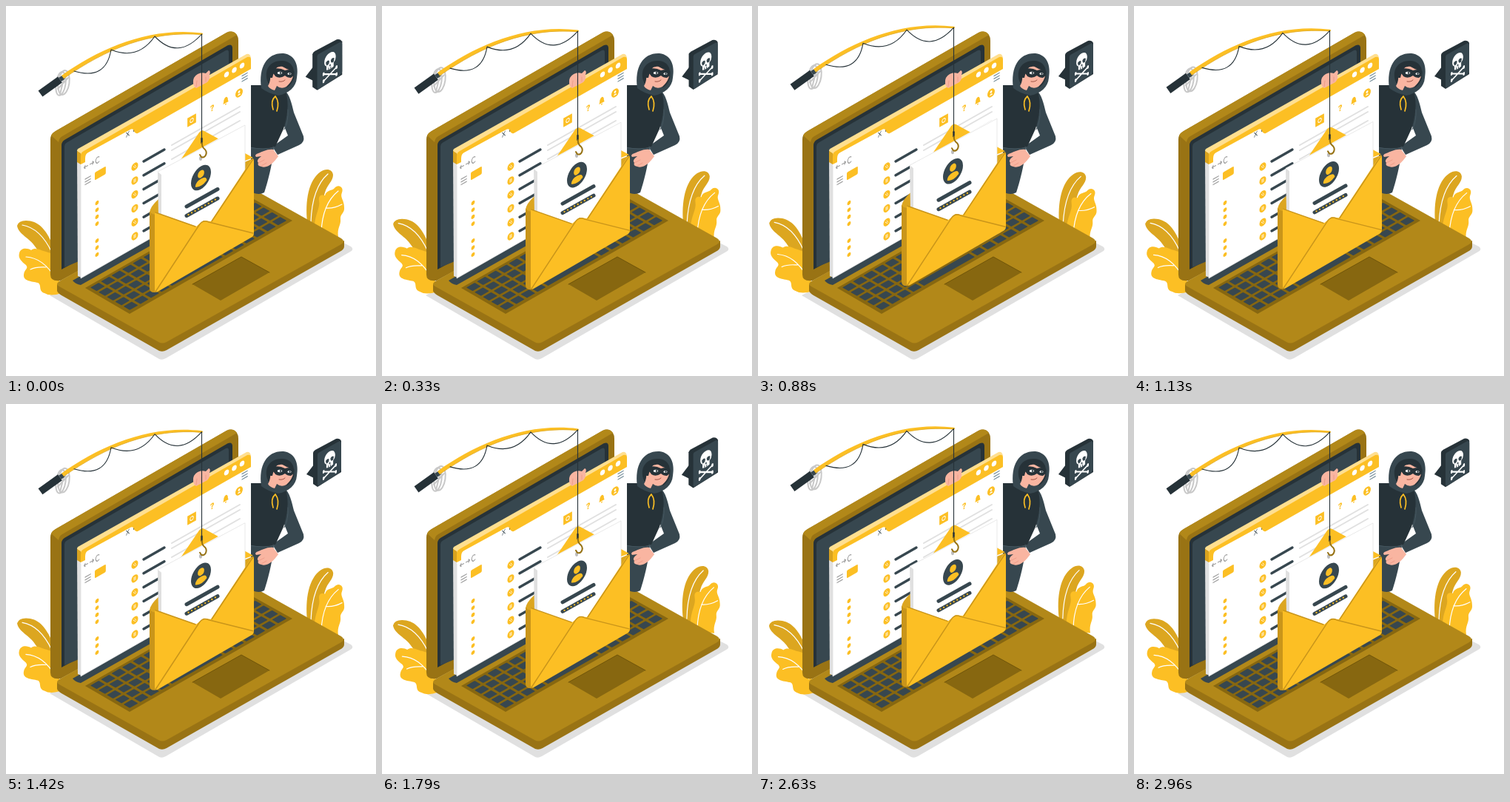
An HTML page that plays this animation: 500 px wide and 500 px high, repeating every 3000 ms.

```html
<!DOCTYPE html>
<html>
<head>
<meta charset="utf-8">
<style>
html, body { margin: 0; height: 100%; overflow: hidden; background: #fff; }
svg { display: block; width: 100vw; height: 100vh; }
.y { fill: #fcbf24; }
.g { fill: #37474f; }
.k { fill: #263238; }
.w { fill: #fff; }
.s { fill: #f9b5a1; }
.line { fill: none; stroke-linecap: round; stroke-linejoin: round; }
text { font: 10px Inter, sans-serif; text-anchor: middle; }
</style>
</head>
<body>
<svg viewBox="0 0 500 500">
  <path fill="#e0e0e0" d="M59 391L207 477Q211 479 216 476L467 331Q470 328 466 325L440 312L80 380Z"/>

  <g id="plants">
    <path fill="#dca620" d="M15 297Q17 290 27 290C43 290 54 301 63 323L66 342Q50 341 40 326C32 313 17 309 15 297Z"/>
    <path class="y" d="M18 334C20 326 29 327 34 330C40 325 48 331 54 332L66 336L75 388Q60 393 52 388C43 385 49 377 43 374C35 372 23 372 24 363C25 355 31 355 27 350C21 345 16 341 18 334Z"/>
    <path class="line" stroke="#fff" stroke-width="1.2" d="M22 296C40 299 53 314 62 333M27 339C43 340 55 349 68 369M33 356C41 352 47 353 54 353"/>
    <path fill="#dca620" d="M407 292C404 263 409 235 425 224C432 219 441 220 442 228C442 237 434 241 431 252C428 262 426 270 424 300L410 300Z"/>
    <path class="y" d="M417 298C417 282 425 273 423 263C422 255 427 255 431 256C433 248 441 250 444 246C449 240 457 245 454 252C451 259 457 262 457 272C458 280 451 281 452 288C453 296 447 300 449 312L425 309Z"/>
    <path class="line" stroke="#fff" stroke-width="1.2" d="M435 227C420 240 413 264 412 292M449 250C434 262 427 280 426 306M432 273Q443 274 454 268"/>
  </g>

  <!-- laptop lid -->
  <path fill="#997314" d="M60 180Q60 173 67 169L298 36Q306 32 312 39Q314 42 314 47V240L74 371Q60 373 60 363Z"/>
  <path fill="#b28819" d="M61 175Q63 171 67 169L298 36Q307 32 312 39L307 42L76 176Q72 178 71 184Z"/>
  <path class="k" d="M75 188Q75 184 79 181L300 53Q306 51 306 57V230L75 356Z"/>
  <path class="g" d="M79 190Q79 186 83 184L297 60Q301 58 301 63V220L96 346L79 353Z"/>

  <!-- laptop base -->
  <path fill="#997314" d="M69 376V385Q70 388 75 391L207 466Q212 468 217 465L451 332Q457 329 457 325V317L211 455Z"/>
  <path fill="#b28819" d="M72 372L311 238Q315 236 319 239L453 314Q459 318 453 322L217 454Q211 457 206 454L72 379Q66 376 72 372Z"/>
  <path class="g" d="M90 371L317 241L330 248L101 377Q94 376 90 371Z"/>
  <path fill="#876710" d="M107 381L326 256L387 290L167 416Z"/>
  <g id="keys"></g>
  <path fill="#876710" d="M252 376L318 339L356 360L290 398Z"/>
  <path class="line" stroke="#705509" d="M252 376L318 339L356 360"/>

  <!-- intruder -->
  <path class="g" d="M326 185H362C362 208 353 240 349 252Q342 256 333 252L326 240Z"/>
  <path class="g" d="M375 113C384 119 386 133 389 144L402 176Q404 184 396 188L367 201L360 190L381 175L371 150Z"/>
  <path class="k" d="M326 107H350L378 115C383 132 380 150 375 166L364 190Q350 195 326 190Z"/>
  <path class="line" stroke="#45565f" d="M329 191Q348 195 363 191M381 140Q382 156 376 167M361 190L367 200"/>
  <path class="s" d="M361 194C353 193 347 197 341 199Q335 201 338 204L345 203Q337 209 341 212Q339 216 345 217C353 220 362 212 368 203Z"/>
  <path class="line" stroke="#e8937f" stroke-width=".7" d="M341 212L349 208M345 216L352 212"/>
  <path class="g" d="M345 111C341 82 353 63 375 64C391 66 396 81 393 97C392 110 382 118 368 121Q354 118 345 111Z"/>
  <path class="k" d="M353 101C348 84 359 73 374 74C387 75 391 86 389 98Q386 106 380 110L356 108Z"/>
  <path class="s" d="M358 88C364 80 380 80 388 86C390 94 386 103 379 109Q372 113 366 108L363 114Q356 112 354 108C358 102 357 95 358 88Z"/>
  <path class="k" d="M355 97C354 83 363 75 375 77Q387 79 389 88Q377 85 371 80Q362 84 360 97Z"/>
  <path class="k" d="M358 86Q368 82 377 87Q384 85 389 87Q391 94 385 97Q380 97 377 94Q370 99 364 95Q362 91 358 90Z"/>
  <ellipse class="w" cx="370" cy="90.500" rx="3.200" ry="1.700"/><ellipse class="w" cx="383" cy="91.500" rx="2.600" ry="1.600"/>
  <circle class="k" cx="371" cy="90.500" r="1.300"/><circle class="k" cx="383.500" cy="91.500" r="1.200"/>
  <path class="line" stroke="#9d5144" d="M369 102Q374 103 377 100"/>
  <path class="line" stroke="#fcbf24" stroke-width="1.700" d="M364 122Q357 128 361 140M364 122Q370 130 366 142"/>

  <!-- browser window -->
  <path fill="#e0e0e0" d="M96 206L103 210V367L97 365Z"/>
  <path class="w" d="M101 203L172 162V170L331 82V237L101 368Z"/>
  <path class="line" stroke="#e0e0e0" stroke-width=".8" d="M101 216V368L330 237"/>
  <path fill="#ffdf90" d="M96 196Q96 193 99 192L325 65Q330 64 331 70L101 201Z"/>
  <path class="y" d="M101 202Q101 198 105 196L326 69Q331 68 331 72V85L178 172Q174 173 172 167Q170 165 166 168L111 198Q107 200 107 206V211L101 214Z"/>
  <path fill="#d9a31f" d="M96 196L101 199V214L96 211Z"/>
  <g id="page"></g>
  <path class="s" d="M253 104Q252 96 259 92Q264 89 270 91L274 87Q277 88 275 93Q276 99 272 103L257 111Q253 109 253 104Z"/>
  <path class="line" stroke="#e8937f" stroke-width=".7" d="M258 101L257 109M264 99V106M270 96V102"/>

  <g id="bubble">
    <path class="k" d="M406 95L416 82V100Z"/>
    <path class="k" d="M415 66Q415 64 418 62L446 47Q451 46 453 50V92L421 112L415 108Z"/>
    <path class="g" d="M421 69Q421 66 424 65L449 51Q453 49 453 53V88Q453 91 450 93L424 110Q421 112 421 108Z"/>
    <g transform="matrix(.92 -.5 0 1 437.5 76)">
      <path class="w" d="M-8 -3C-8 -15 8 -15 8 -3Q8 1 5 3V8Q0 10 -5 8V3Q-8 1 -8 -3Z"/>
      <path class="g" d="M-6 -2Q-3 -5 -1 -2Q-1 3 -5 2ZM6 -2Q3 -5 1 -2Q1 3 5 2ZM0 2L1.500 5H-1.500Z"/>
      <path class="line" stroke="#37474f" stroke-width=".8" d="M-2 6.500V9M1 6.500V9"/>
      <path class="line" stroke="#fff" stroke-width="2" d="M-9 11L9 20M9 11L-9 20"/>
      <path class="line" stroke="#fff" stroke-width="2.600" d="M-9 10V12M9 10V12M-9 19V21M9 19V21"/>
    </g>
  </g>

  <g id="bait">
    <!-- envelope and card -->
    <path fill="#dca620" d="M194 285V279Q195 271 206 261L334 206V300L200 380Z"/>
    <path class="y" d="M206 252L261 171Q264 167 268 169L334 205Z"/>
    <path fill="#e0e0e0" d="M205 224L211 227V290L206 285Z"/>
    <path class="w" d="M205 224L320 161Q323 160 323 164V240L268 305L210 290V228Z"/>
    <path class="line" stroke="#e0e0e0" stroke-width=".7" d="M205 224L323 161V222"/>
    <g transform="matrix(.87 -.5 0 1 263.5 232)">
      <circle class="g" r="15.500"/><circle class="y" cy="-5" r="5"/>
      <path class="y" d="M-9 8Q-8.500 1.500 0 1.500T9 8Q0 14 -9 8Z"/>
    </g>
    <path class="line" stroke="#37474f" stroke-width="5" d="M244 271L286 247.500M244 283.500L286 260"/>
    <path class="line" stroke="#fcbf24" stroke-width="2.300" stroke-dasharray="0 5.200" d="M246.500 282L285 260.500"/>
    <path fill="#c9951a" d="M194 277Q195 281 202 282V387Q194 388 194 381Z"/>
    <path class="y" d="M201 279L257 298L267 290L277 291L331 209Q335 204 335 210V307Q335 311 331 313L205 386Q201 388 201 383Z"/>
    <path class="line" stroke="#c9951a" stroke-width="1.500" d="M202 386L261 296Q266 288 274 292L334 307M202 279L256 298M334 207L278 291"/>

    <!-- rod, line and hook -->
    <g class="line" stroke="#c8c8c8" stroke-width="2">
      <ellipse cx="78" cy="103.500" rx="7.500" ry="16.500" transform="rotate(8 78 103.500)"/>
      <ellipse cx="74" cy="105" rx="6.500" ry="16" transform="rotate(8 74 105)"/>
      <path d="M70 112L84 97M73 119L80 91"/>
    </g>
    <path stroke="#263238" stroke-width="10" d="M46.500 118.500L73 99.500"/>
    <path stroke="#37474f" stroke-width="6" d="M73 99.500L78 96"/>
    <path class="y" d="M75 94C128 56 195 28 265 36.500Q267 37.500 265 39C195 33 135 58 78 98Z"/>
    <path class="line" stroke="#dca620" stroke-width=".8" d="M78 98C135 58 195 33 265 38.500"/>
    <path class="line" stroke="#263238" stroke-width="1.100" d="M92 88Q135 101 142 59Q178 74 201 41Q232 74 264.500 38V181"/>
    <ellipse cx="263" cy="206" rx="2" ry="3" fill="#bdbdbd"/>
    <path class="line" stroke="#263238" stroke-width="2.500" d="M264.500 179V185"/>
    <path class="line" stroke="#967214" stroke-width="2" d="M265 185Q264 190 269 194C273 199 269 206 264 204L262 201"/>
  </g>
</svg>
<script>
const $ = id => document.getElementById(id);
const iso = (x, y, body) => `<g transform="matrix(.9 -.51 0 1 ${x} ${y})">${body}</g>`;
const repeat = (n, f) => Array.from({length: n}, (_, i) => f(i)).join('');
const stroke = (d, color, w) => `<path class="line" stroke="${color}" stroke-width="${w}" d="${d}"/>`;

// Keyboard: unit axes run along the rows and the columns
const cols = 15, rows = 5;
const key = (c, r, w = 1) =>
  `<rect class="g" x="${c + .11}" y="${r + .12}" width="${w - .22}" height=".76" rx=".06"/>`;
const row = r => r < rows - 1
  ? repeat(cols, c => key(c, r))
  : repeat(4, c => key(c, r)) + key(4, r, 5) + repeat(6, c => key(c + 9, r));
$('keys').innerHTML =
  `<g transform="matrix(${215 / cols} ${-122.7 / cols} ${56 / rows} ${32 / rows} 111 380.500)">${repeat(rows, row)}</g>`;

const gray = '#9e9e9e', dark = '#37474f', pale = '#e0e0e0';
$('page').innerHTML =
  repeat(3, i => iso(298 + 10.5 * i, 92.5 - 6 * i, '<circle class="w" r="3.600"/>')) +
  iso(164.5, 176.5, `<text fill="${dark}" style="font-size:9px">X</text>`) +
  iso(108, 217, stroke('M2.800 0H-2.800M-1 -2L-2.800 0L-1 2', gray, 1.2)) +
  iso(116, 212.5, stroke('M-2.800 0H2.800M1 -2L2.800 0L1 2', gray, 1.2)) +
  iso(124, 208, stroke('M2 -3A3 4 0 1 0 2 3', gray, 1.2)) +
  iso(107, 234, repeat(3, i => stroke(`M0 ${i * 3.7}H8`, gray, 1.4))) +
  iso(319, 94.5, repeat(3, i => stroke(`M0 ${i * 3.7}H8`, '#78909c', 1.4))) +
  iso(120, 225, '<rect class="y" width="16.500" height="10.500" rx="1.500"/>') +
  repeat(7, i => iso(123, 266 + 9.4 * i + (i > 3 ? 13.5 : 0), '<circle class="y" r="2.700"/>')) +
  repeat(6, i => iso(174, 217 + 18.8 * i,
    `<circle class="y" r="5"/>${stroke(i % 2 ? 'M-1 -2V2M1 -2V2' : 'M-2 -1L1 2M0 -2L2 1', '#fff', .8)}`) +
    stroke(`M186 ${210 + 18.8 * i}l28 -16`, dark, 3.4)) +
  stroke('M224 188L316 136M224 195L316 143M224 207L316 155', pale, 2) +
  iso(251, 154.5, '<rect class="y" x="-6.500" y="-6" width="13" height="12"/><circle class="line" r="2.500" stroke="#fff"/>') +
  iso(278.5, 142, '<text fill="#fcbf24" style="font-weight:800;font-size:11px">?</text>') +
  iso(297, 128, '<path class="y" d="M-4 3Q-3 1 -3 -2Q-2 -5 0 -5T3 -2Q3 1 4 3ZM-1.500 4H1.500L0 6Z"/>') +
  iso(315, 117.5, '<circle class="y" r="5.500"/><circle class="w" cy="-1.500" r="1.600"/><path class="w" d="M-2.500 3Q0 -1 2.500 3Z"/>');

// Two beats per cycle, each a quick swell and a linear fall
function beat(t) {
  const ms = (t + 45) % 1500;
  const pulse = (start, fall) => {
    const d = ms - start;
    if (d < 0 || d > 150 + fall) return 0;
    return d < 150 ? Math.sin(d / 150 * Math.PI / 2) : 1 - (d - 150) / fall;
  };
  return 1 + .12 * (pulse(0, 300) + pulse(600, 150));
}

function draw(now) {
  const t = now % 3000;
  const lift = -4.75 * (1 - Math.cos(t / 1500 * 2 * Math.PI));
  $('bait').setAttribute('transform', `translate(0 ${lift})`);
  $('plants').setAttribute('transform', `rotate(${Math.sin(t / 3000 * 2 * Math.PI)} 236 305)`);
  $('bubble').setAttribute('transform', `translate(430 80) scale(${beat(t)}) translate(-430 -80)`);
}

const start = performance.now();
function tick() {
  draw(performance.now() - start);
  requestAnimationFrame(tick);
}
tick();
</script>
</body>
</html>
```
